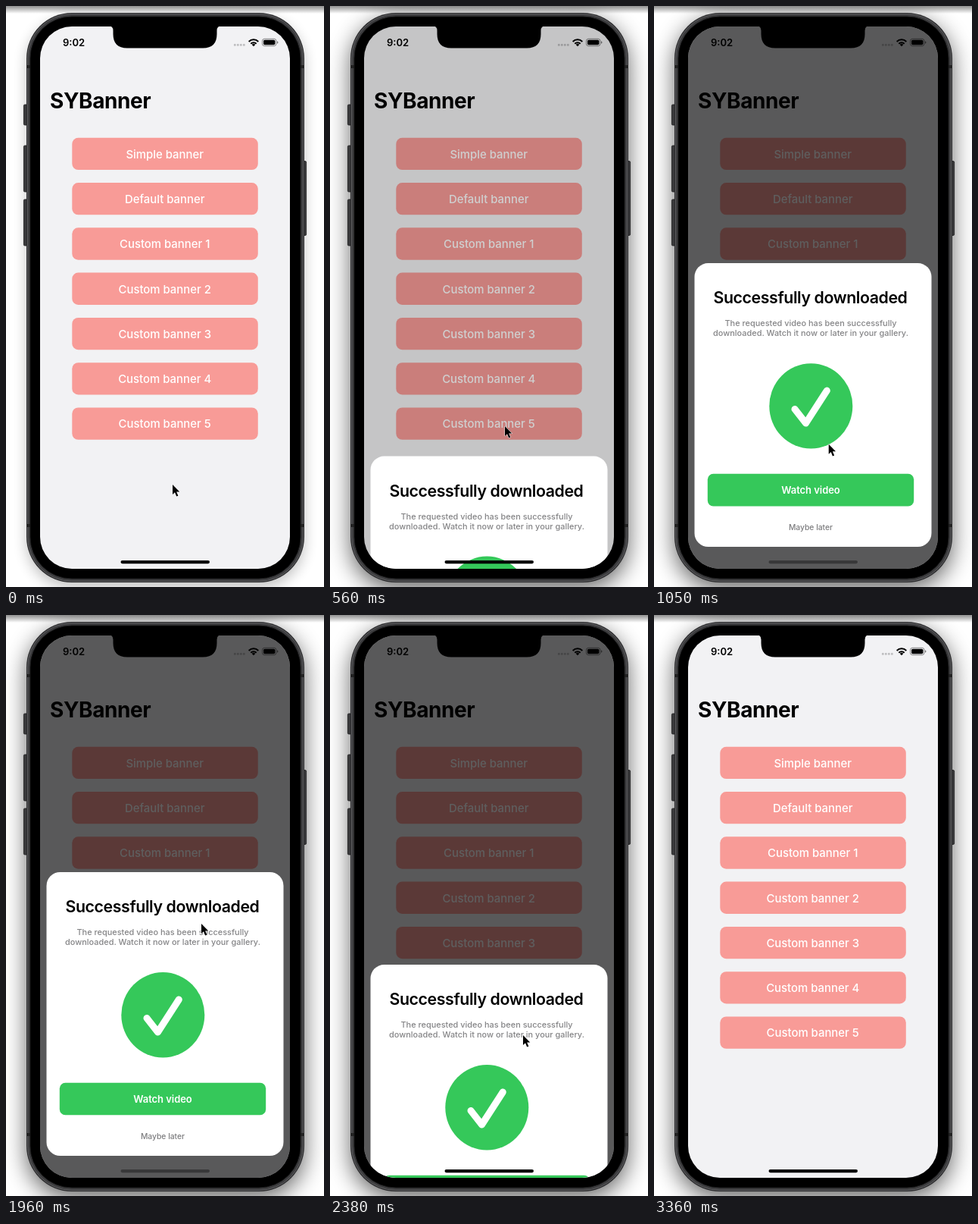
These frames come from a looping animation (420 by 766 pixels, 3.64 s). An HTML page:

```html
<!DOCTYPE html>
<html lang="en">
<head>
<meta charset="utf-8">
<title>Banner demo</title>
<style>
  html, body { margin: 0; width: 100%; height: 100%; overflow: hidden; background: #fff; }
  svg { display: block; width: 420px; height: 766px; font-family: Inter, Roboto, sans-serif; }
  .mid { text-anchor: middle; }
  .label { font-size: 14.9px; font-weight: 500; fill: #fff; }
  .body { font-size: 10.9px; font-weight: 500; letter-spacing: .02px; fill: #848486; }
</style>
</head>
<body>
<svg viewBox="0 0 420 766">
  <defs>
    <linearGradient id="topShade" x2="0" y2="1">
      <stop stop-color="#000" stop-opacity=".44"/>
      <stop offset="1" stop-color="#000" stop-opacity="0"/>
    </linearGradient>
    <filter id="soft" x="-30%" y="-20%" width="160%" height="140%"><feGaussianBlur stdDeviation="9"/></filter>
    <filter id="wide" x="-30%" y="-20%" width="160%" height="140%"><feGaussianBlur stdDeviation="15"/></filter>
    <clipPath id="screen"><rect x="45" y="27" width="330" height="715" rx="42"/></clipPath>
  </defs>
  <rect width="420" height="766" fill="#fff"/>

  <rect width="420" height="10" fill="url(#topShade)"/>
  <rect id="idle" x="27" y="16" width="367" height="751" rx="60" opacity=".24" filter="url(#soft)"/>
  <rect id="active" x="27" y="18" width="367" height="751" rx="60" opacity=".6" filter="url(#wide)"/>

  <g fill="#39393b" stroke="#1d1d1f" stroke-width=".8">
    <rect x="23.4" y="130" width="6" height="27" rx="1.5"/>
    <rect x="23.4" y="184" width="6" height="61" rx="1.5"/>
    <rect x="23.4" y="255" width="6" height="61" rx="1.5"/>
    <rect x="391" y="204.5" width="5.6" height="98" rx="1.5"/>
  </g>
  <rect x="27" y="9" width="367" height="751" rx="60" fill="#2a2a2c"/>
  <rect x="28.5" y="10.5" width="364" height="748" rx="58.5" fill="#3c3c3e" stroke="#6a6a6c" stroke-width=".8"/>
  <path d="M27.5 80h5M27.5 685h5M388.5 80h5M388.5 685h5" stroke="#222" stroke-width="4"/>
  <rect x="32" y="14" width="357" height="741" rx="55" stroke="#161617"/>

  <g clip-path="url(#screen)">
    <rect x="45" y="27" width="330" height="715" fill="#f2f2f4"/>
    <text x="58" y="135" font-size="28" font-weight="700" letter-spacing="-.4">SYBanner</text>
    <g id="buttons"></g>
    <path d="M302.3 51.3h13" stroke="#bdbdbf" stroke-width="3" stroke-linecap="round" stroke-dasharray="0 4"/>
    <rect id="dim" x="45" y="27" width="330" height="715"/>

    <text x="75" y="52.7" font-size="13" font-weight="600">9:02</text>
    <path d="M320.7 47a8.8 8.8 0 0 1 12.6 0M323.3 49.7a5.2 5.2 0 0 1 7.4 0" fill="none" stroke="#000" stroke-width="2"/>
    <path d="M327 53.3l-2.2-2.4a3.1 3.1 0 0 1 4.4 0z"/>
    <rect x="338.5" y="43.3" width="18.4" height="9.4" rx="2.8" fill="none" stroke="#000" stroke-opacity=".45"/>
    <rect x="340" y="44.8" width="15.4" height="6.4" rx="1.6"/>
    <path d="M358 46.3q1.5 .4 1.5 1.7t-1.5 1.7z" opacity=".5"/>

    <g id="card">
      <rect x="53.5" width="313" height="374" rx="18" fill="#fff"/>
      <text class="mid" x="206.5" y="53" font-size="21.3" font-weight="600" letter-spacing="-.4">Successfully downloaded</text>
      <text class="mid body" x="207" y="83">The requested video has been successfully</text>
      <text class="mid body" x="207" y="96">downloaded. Watch it now or later in your gallery.</text>
      <ellipse cx="207.3" cy="188.3" rx="55" ry="56.2" fill="#35c85a"/>
      <path d="M186 192.5L200.5 211L228.3 168" fill="none" stroke="#fff" stroke-width="9" stroke-linecap="round" stroke-linejoin="round"/>
      <rect x="70.8" y="277.7" width="272.4" height="42.6" rx="7.5" fill="#35c85a"/>
      <text class="mid" x="207" y="303.6" font-size="13" font-weight="600" letter-spacing="-.05" fill="#fff">Watch video</text>
      <text class="mid" x="207" y="352" font-size="10.3" font-weight="500" fill="#7c7c7e">Maybe later</text>
    </g>
    <rect id="home" x="151.5" y="731" width="117.5" height="4.2" rx="2.1"/>
  </g>
  <path d="M135 26q6.5 0 6.5 6.5V37q0 18.500 18.500 18.500H260q18.500 0 18.500-18.500V32.500q0-6.500 6.500-6.500z"/>

  <path id="cursor" d="M0 0V13L3 10.300L5.200 15.600L7.400 14.700L5.200 9.500H9.300z" stroke="#fff" stroke-linejoin="round" paint-order="stroke"/>
</svg>
<script>
const LOOP = 3640, TICK = 70;
const REST = 339, GONE = 780, CARD_H = 374, DIM = .63;
const FOCUS = 350, PRESS = 420, OPEN = 500, RELEASE = 2380, GRAB = 93;
const $ = id => document.getElementById(id);

const ramp = (t, from, to) => Math.min(1, Math.max(0, (t - from) / (to - from)));
const ease = k => k * k * (3 - 2 * k);
const glide = (t, from, to) => ease(ramp(t, from, to));

// Each stroke of the pointer: begin, end, x, y
const strokes = [
  [0, 420, 231, 554],
  [890, 1400, 209, 656],
  [1470, 1960, 258, 407],
  [2030, 2625, 246, 640],
  [2940, 3360, 238, 785]
];

// Sideways movement lags behind, so each stroke bends
function pointer(t) {
  let x = 220, y = 631;
  for (const [from, to, toX, toY] of strokes) {
    const k = glide(t, from, to);
    x += (toX - x) * k ** 3;
    y += (toY - y) * k;
  }
  return [x, y];
}

// Springs in, follows the drag, then drops out
function cardTop(t) {
  if (t < OPEN) return GONE;
  if (t < 1500) {
    const s = (t - OPEN) / 1000, w = 14.6, damp = 15.3;
    const swing = Math.cos(w * s) + damp / w * Math.sin(w * s);
    return REST + (GONE - REST) * Math.exp(-damp * s) * swing;
  }
  const held = t < 2000 ? REST : Math.max(REST, pointer(Math.min(t, RELEASE))[1] - GRAB);
  return held + (GONE - held) * glide(t, RELEASE, RELEASE + 280);
}

const names = ["Simple banner", "Default banner"];
for (let n = 1; n <= 5; n++) names.push("Custom banner " + n);
$("buttons").innerHTML = names.map((name, i) => {
  const y = 173.8 + i * 59.27;
  return `<rect x="87.3" y="${y}" width="245.5" height="42.3" rx="8" fill="#f89b97"/>
    <text class="mid label" x="209.7" y="${y + 27}">${name}</text>`;
}).join("");
const lastLabel = $("buttons").lastElementChild;

function draw(now) {
  const t = Math.floor(now % LOOP / TICK) * TICK;
  const [x, y] = pointer(t), top = cardTop(t);
  const dark = DIM * (ramp(t, OPEN, 700) - glide(t, RELEASE, RELEASE + 210));
  $("idle").style.display = t < FOCUS ? "" : "none";
  $("active").style.display = t < FOCUS ? "none" : "";
  lastLabel.style.opacity = t >= PRESS && t < OPEN + TICK / 2 ? .2 : 1;
  $("dim").style.opacity = dark;
  $("card").setAttribute("transform", `translate(0 ${top})`);
  $("home").style.fill = dark > .3 && top + CARD_H < 731 ? "#383839" : "#000";
  $("cursor").setAttribute("transform", `translate(${x} ${y})`);
}

const start = performance.now();
function loop() {
  draw(performance.now() - start);
  requestAnimationFrame(loop);
}
loop();
</script>
</body>
</html>
```
